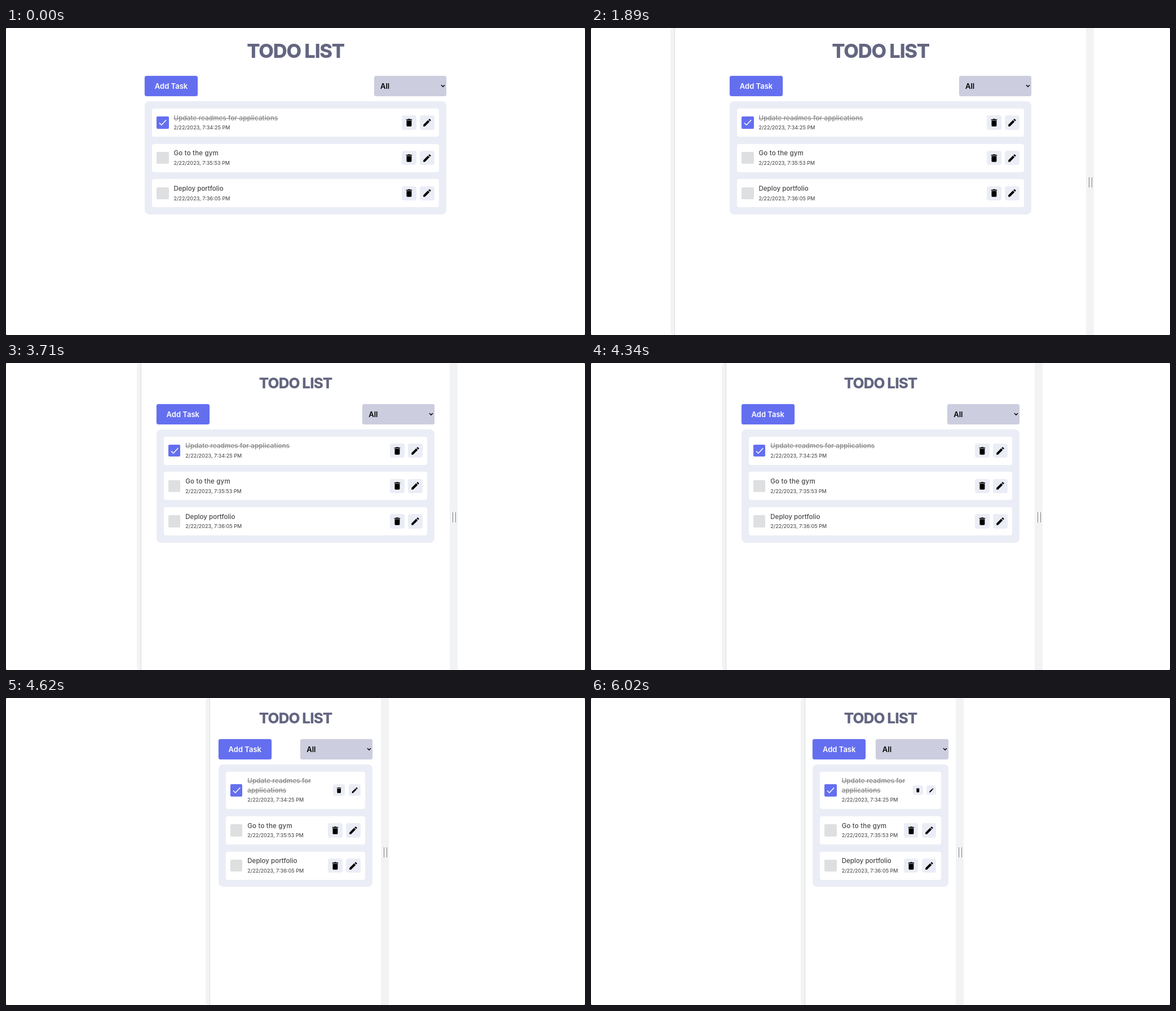
Animation, 1027 px wide and 545 px high, one loop 6160 ms. Source, as an HTML page:

```html
<!DOCTYPE html>
<html lang="en">
<head>
<meta charset="utf-8">
<title>Todo list</title>
<style>
* { box-sizing: border-box; margin: 0; padding: 0; }
html, body { width: 100%; height: 100%; overflow: hidden; background: #555; }

/* --half: half the viewport width, --list: half the list width */
.stage {
  --half: 620px;
  --list: 267.5px;
  --drop: 12.2px;
  --head: 34.5px;
  --head-y: 41px;
  --first: 50px;
  --btn: 25.6px;
  position: relative;
  width: 1027px;
  height: 545px;
  overflow: hidden;
  border-radius: 2px;
  background: #fff;
  font: 500 11.5px Inter, "Open Sans", sans-serif;
  animation: resize 6160ms step-end infinite;
}
@keyframes resize {
  0% { --half: 620px; --list: 267.5px; --drop: 12.2px; --head: 34.5px; --head-y: 41px; --first: 50px; --btn: 25.6px; }
  26.13% { --half: 364.8px; }
  53.4% { --half: 273.5px; --list: 246.7px; --drop: 0px; --head: 25.9px; --head-y: 36px; }
  71.58% { --half: 151.5px; --list: 136.7px; --first: 66.5px; --btn: 21px; }
  85.22% { --half: 133.5px; --list: 120.3px; --btn: 17.3px; }
}

.edge { position: absolute; top: 0; height: 545px; background: #f2f3f4; }
.edge.left {
  right: calc(513.5px + var(--half));
  width: 8px;
  border-right: 1px solid #dcdddf;
  border-radius: 6px 0 0 6px;
}
.edge.right { left: calc(513.5px + var(--half)); width: 13.5px; }
.edge.right::after {
  content: "";
  position: absolute;
  left: 5px;
  top: 265px;
  width: 4px;
  height: 18px;
  border: solid #808183;
  border-width: 0 1px;
}

h1 {
  position: absolute;
  left: 0;
  top: calc(var(--head-y) - 25px);
  width: 1027px;
  text-align: center;
  font-size: var(--head);
  font-weight: 800;
  line-height: 50px;
  letter-spacing: -.034em;
  color: #646681;
}
.app {
  position: absolute;
  left: calc(513.5px - var(--list));
  top: calc(72.7px + var(--drop));
  width: calc(2 * var(--list));
}
.bar { display: flex; justify-content: space-between; margin-bottom: 8.8px; }
.add, .filter {
  height: 36.4px;
  border-radius: 4px;
  font-size: 13px;
  font-weight: 600;
  line-height: 36.4px;
}
.add { width: 94px; text-align: center; color: #fff; background: #646ff0; box-shadow: 0 0 1px #646ff0; }
.filter { position: relative; width: 128.5px; padding-left: 11.5px; color: #000; background: #cccdde; box-shadow: 0 0 1px #cccdde; }
.filter svg { position: absolute; right: 2px; top: 15.5px; width: 8px; height: 6px; }

.list { padding: 12.7px 12.8px; border-radius: 8px; background: #ebedf6; }
.item {
  display: flex;
  align-items: center;
  height: 50px;
  padding: 0 8.6px 0 8.4px;
  border-radius: 4px;
  background: #fff;
}
.item + .item { margin-top: 12.8px; }
.item:first-child { height: var(--first); }
.box { flex: none; width: 21.5px; height: 21.5px; margin-right: 8.8px; border-radius: 2px; background: #dedfe1; }
.done .box { background: #646ff0; }
.box svg { display: block; width: 100%; height: 100%; }
.text { position: relative; top: .6px; flex: 1; min-width: 0; }
.name { line-height: 16.4px; letter-spacing: .19px; color: #484848; }
.tight { letter-spacing: .04px; }
.done .name { color: #858585; text-decoration: line-through; }
.time { font-size: 9px; line-height: 17.2px; letter-spacing: 0; white-space: nowrap; color: #585858; }
.btn {
  --size: 25.6px;
  flex: none;
  display: flex;
  align-items: center;
  justify-content: center;
  width: var(--size);
  height: var(--size);
  margin-left: 6.5px;
  border-radius: 4px;
  background: #ebedf6;
}
.done .btn { --size: var(--btn); }
.btn svg { width: calc(var(--size) - 7.7px); height: calc(var(--size) - 7.7px); }
</style>
</head>
<body>
<svg width="0" height="0" style="position:absolute">
  <symbol id="trash" viewBox="0 0 24 24">
    <path d="M6 19c0 1.1.9 2 2 2h8c1.1 0 2-.9 2-2V7H6zM19 4h-3.5l-1-1h-5l-1 1H5v2h14z"/>
  </symbol>
  <symbol id="pencil" viewBox="0 0 24 24">
    <path d="M3 17.25V21h3.75L17.8 9.95 14.05 6.2zM20.7 7.05a1 1 0 0 0 0-1.42l-2.33-2.33a1 1 0 0 0-1.42 0l-1.83 1.83 3.75 3.75z"/>
  </symbol>
</svg>

<div class="stage">
  <div class="edge left"></div>
  <div class="edge right"></div>
  <h1>TODO LIST</h1>
  <div class="app">
    <div class="bar">
      <div class="add">Add Task</div>
      <div class="filter">All
        <svg viewBox="0 0 8 6"><path d="M1 1.2 4 4.2 7 1.2" fill="none" stroke="#000" stroke-width="1.6"/></svg>
      </div>
    </div>
    <div class="list">
      <div class="item done">
        <div class="box">
          <svg viewBox="0 0 21.5 21.5"><path d="M5 11.5 8.8 15.2 17.2 6.2" fill="none" stroke="#fff" stroke-width="1.5"/></svg>
        </div>
        <div class="text">
          <p class="name">Update readmes for applications</p>
          <p class="time">2/22/2023, 7:34:25 PM</p>
        </div>
        <div class="btn"><svg><use href="#trash"/></svg></div>
        <div class="btn"><svg><use href="#pencil"/></svg></div>
      </div>
      <div class="item">
        <div class="box"></div>
        <div class="text">
          <p class="name">Go to the gym</p>
          <p class="time">2/22/2023, 7:35:53 PM</p>
        </div>
        <div class="btn"><svg><use href="#trash"/></svg></div>
        <div class="btn"><svg><use href="#pencil"/></svg></div>
      </div>
      <div class="item">
        <div class="box"></div>
        <div class="text">
          <p class="name tight">Deploy portfolio</p>
          <p class="time">2/22/2023, 7:36:05 PM</p>
        </div>
        <div class="btn"><svg><use href="#trash"/></svg></div>
        <div class="btn"><svg><use href="#pencil"/></svg></div>
      </div>
    </div>
  </div>
</div>
</body>
</html>
```
